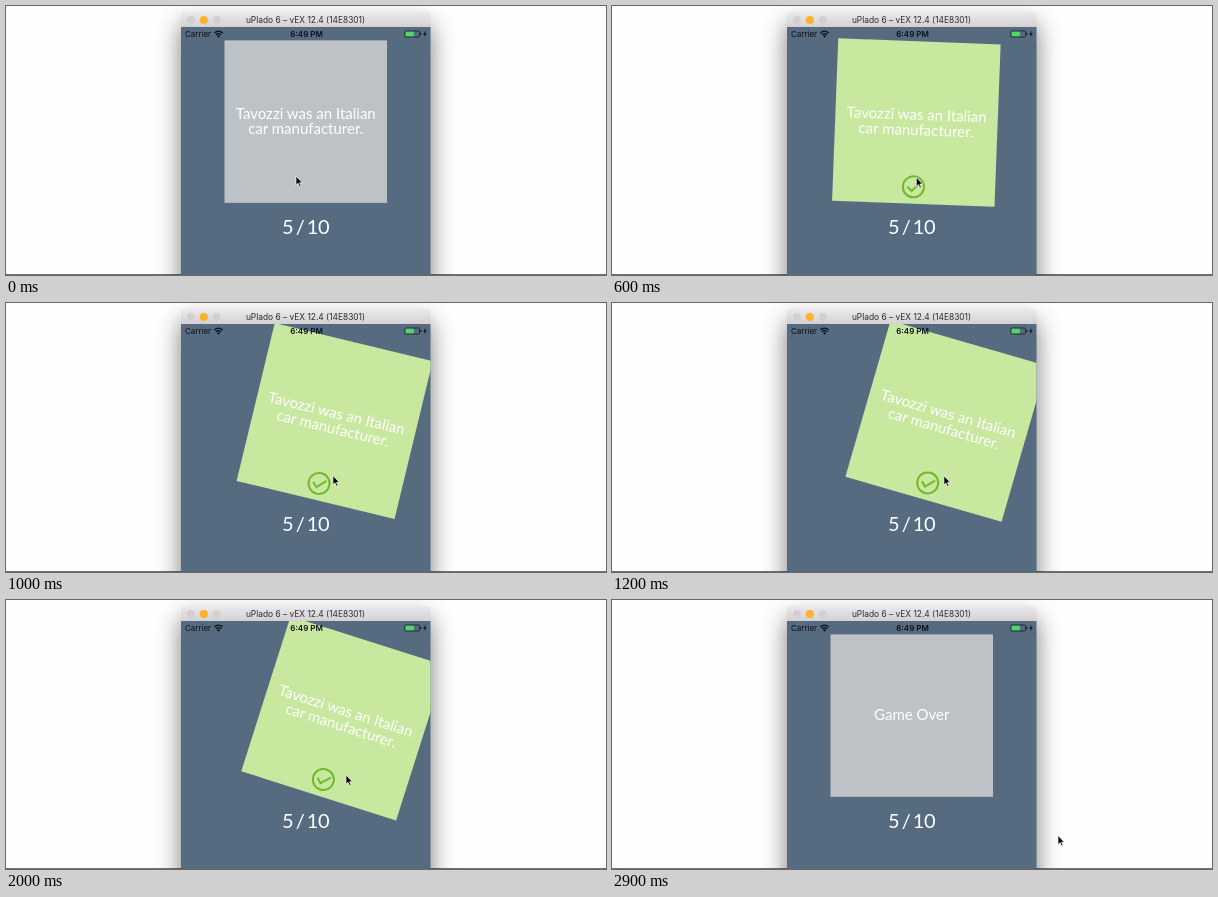
These frames come from a looping animation (600 by 269 pixels, 3 s). An HTML page:

```html
<!DOCTYPE html>
<html lang="en">
<head>
<meta charset="utf-8">
<title>Quiz card swipe</title>
<style>
  html, body { margin: 0; width: 100%; height: 100%; overflow: hidden; background: #fefefe; }
  svg { display: block; width: 100vw; height: 100vh; }
  text { text-anchor: middle; }
  .ui { font: 8px Inter, "Liberation Sans", sans-serif; fill: #0c1016; }
  .title { font-size: 8.4px; fill: #2c2a2c; }
  .clock { font-weight: 600; }
  .card { font: 15px Lato, sans-serif; fill: #fff; }
  .score { font: 20px Lato, sans-serif; letter-spacing: -.5px; word-spacing: -2px; fill: #fff; }
</style>
</head>
<body>
<svg viewBox="0 0 600 269" preserveAspectRatio="none">
  <defs>
    <filter id="blur" x="-30%" y="-30%" width="160%" height="160%"><feGaussianBlur stdDeviation="12"/></filter>
    <linearGradient id="bar" x2="0" y2="1">
      <stop stop-color="#ebe9eb"/><stop offset="1" stop-color="#d3d1d3"/>
    </linearGradient>
    <clipPath id="screen"><rect x="175" y="21" width="249.5" height="248"/></clipPath>
  </defs>

  <rect y="268" width="600" height="1" fill="#746f78"/>
  <rect x="175" y="18" width="249.5" height="330" opacity=".52" filter="url(#blur)"/>
  <path d="M175 21V10q0-4 4-4h241.5q4 0 4 4v11z" fill="url(#bar)"/>
  <rect x="175" y="21" width="249.5" height="248" fill="#566a80"/>
  <g fill="#d2d0d2">
    <circle cx="185" cy="14" r="4"/>
    <circle cx="197.8" cy="14" r="4.1" fill="#fbb32c"/>
    <circle cx="210.8" cy="14" r="4"/>
  </g>
  <text class="ui title" x="299.5" y="17.3">uPlado 6 – vEX 12.4 (14E8301)</text>

  <g clip-path="url(#screen)">
    <text class="score" x="299.5" y="228.3">5 / 10</text>
    <g id="card">
      <rect id="face" x="-81.25" y="-81.25" width="162.5" height="162.5"/>
      <g id="question" class="card">
        <text y="-2.8">Tavozzi was an Italian</text>
        <text y="12.6">car manufacturer.</text>
      </g>
      <text id="over" class="card" y="4.6">Game Over</text>
      <g id="tick" transform="translate(-.5 64.3)" fill="none" stroke="#70b92c" stroke-width="2">
        <circle r="10.5"/><path d="M-6 0L-1.7 4.3L6.6-4.2"/>
      </g>
    </g>
  </g>

  <g class="ui">
    <text x="192" y="31">Carrier</text>
    <text class="clock" x="300.5" y="31">6:49 PM</text>
    <g fill="none" stroke="#0c1016" stroke-width="1.3">
      <path d="M208.3 27q4.2-3.8 8.4 0M209.9 28.8q2.6-2.3 5.2 0"/>
      <rect x="398.9" y="25" width="14.6" height="6" rx="1" stroke-width=".7"/>
    </g>
    <path d="M211 30l1.5-.9 1.5.9-1.5 1.7z"/>
    <rect x="399.6" y="25.7" width="8.2" height="4.6" fill="#4cd964"/>
    <path d="M414.3 27h1v2h-1zM419.6 24.8l-2.4 3.6h1.7l-.6 2.8 2.5-3.8h-1.7z"/>
  </g>

  <path id="cursor" d="M0 0V9.2L2.1 7.3L3.6 10.7L5.1 10L3.6 6.8H6.4z" stroke="#fff" stroke-width=".7"/>
</svg>
<script>
  const LOOP = 3000, STEP = 100;
  const DRAG = 500, DRIFT = 1400, LEAVE = 2000, OVER = 2100;
  const HOME = { x: 299.75, y: 115.6 };
  const REACH = 37.6, RISE = 2.8, TILT = 0.47;

  const el = id => document.getElementById(id);
  const show = (id, on) => el(id).setAttribute("visibility", on ? "visible" : "hidden");
  const move = (id, x, y, turn = 0) =>
    el(id).setAttribute("transform", `translate(${x} ${y}) rotate(${turn})`);
  const lerp = (a, b, k) => a + (b - a) * k;
  const progress = (t, from, to) => Math.min(1, Math.max(0, (t - from) / (to - from)));

  // Settles towards 1; a power above 1 softens the start.
  const settle = (t, from, tau, power = 1) =>
    1 - Math.exp(-((Math.max(0, t - from) / tau) ** power));

  function pointer(t, pull) {
    if (t < DRAG) return [290, 170];
    const drift = progress(t, DRIFT, LEAVE), exit = settle(t, LEAVE, 39);
    const x = 300 + 35 * pull + 5 * drift, y = 171 + 2 * pull + 2 * drift;
    return [lerp(x, 446, exit), lerp(y, 235.4, exit)];
  }

  function draw(ms) {
    const t = Math.floor((ms % LOOP) / STEP) * STEP;
    const dragging = t >= DRAG && t < OVER;
    const pull = settle(t, DRAG, 388, 1.5);
    const shift = dragging ? pull : 0, dx = REACH * shift;

    move("cursor", ...pointer(t, pull));
    move("card", HOME.x + dx, HOME.y + RISE * Math.sqrt(shift), dx * TILT);
    el("face").setAttribute("fill", dragging ? "#c8e8a0" : "#bdc2c7");
    show("tick", dragging);
    show("question", t < OVER);
    show("over", t >= OVER);
  }

  const start = performance.now();
  function frame() {
    draw(performance.now() - start);
    requestAnimationFrame(frame);
  }
  frame();
</script>
</body>
</html>
```
